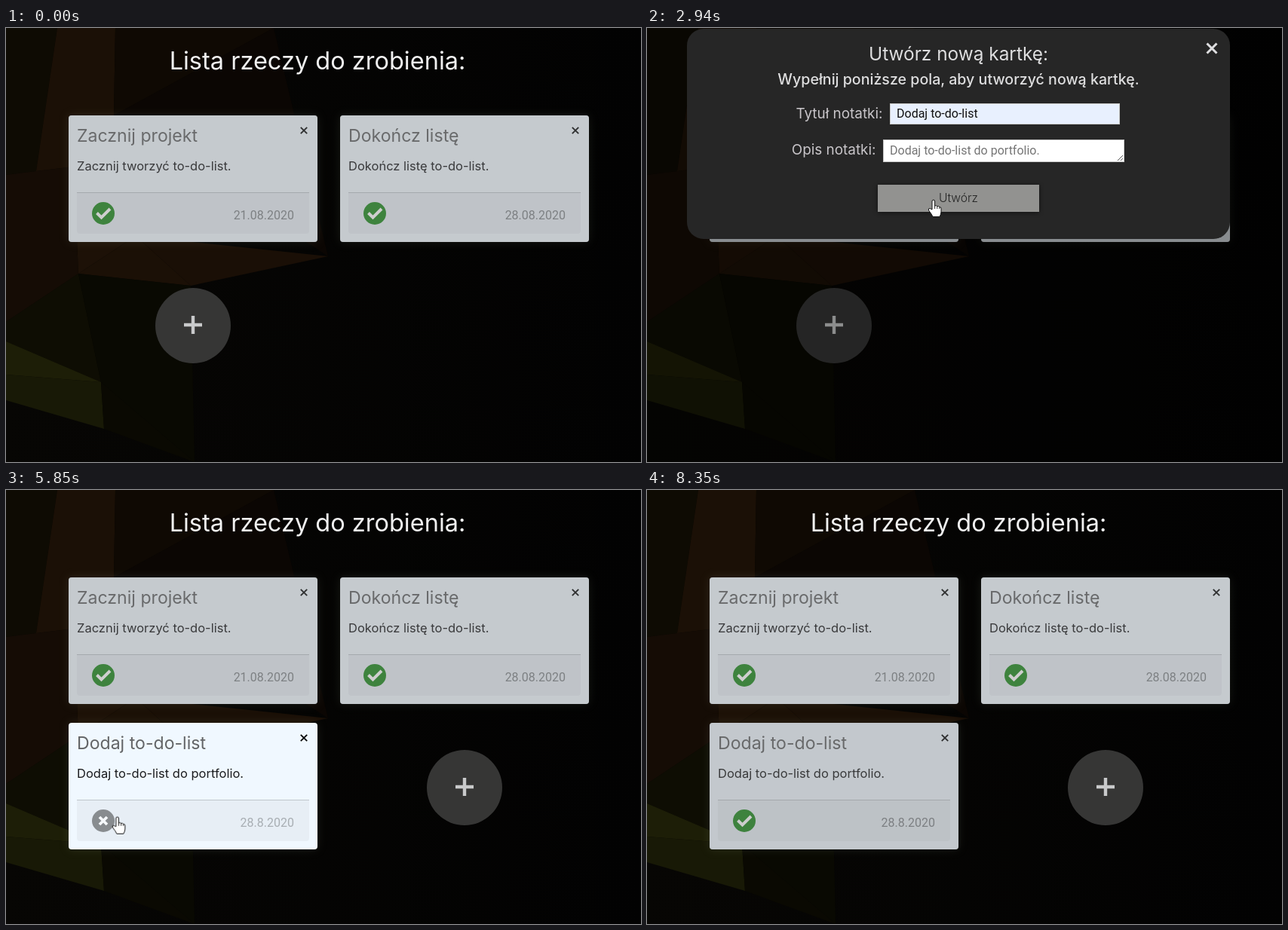
An HTML page that plays this animation: 842x576 px, repeating every 9.04 s.

```html
<!DOCTYPE html>
<html lang="pl">
<head>
<meta charset="utf-8">
<title>Lista rzeczy do zrobienia</title>
<style>
  html, body { margin: 0; width: 100%; height: 100%; overflow: hidden; background: #040302; }
  svg { display: block; width: 842px; height: 576px; }
  text { font-family: Inter, "Open Sans", sans-serif; }
  .roboto { font-family: Roboto, Arial, sans-serif; }
  .mid { text-anchor: middle; }
  .end { text-anchor: end; }
  .card { filter: drop-shadow(0 0 7px rgba(200, 215, 180, .1)); }
  .button { filter: drop-shadow(0 1px 3px #000); }
  .line { fill: none; }
  .off { opacity: 0; }
</style>
</head>
<body>
<svg id="stage" viewBox="0 0 842 576" xmlns="http://www.w3.org/2000/svg"></svg>
<script>
const LOOP = 9040;
const VEIL = .35;

const text = (x, y, size, str, attrs = '') =>
  `<text x="${x}" y="${y}" font-size="${size}" ${attrs}>${str}</text>`;

const box = (x, y, width, height, attrs) =>
  `<rect x="${x}" y="${y}" width="${width}" height="${height}" ${attrs}/>`;

const cross = (x, y, r, width, color) =>
  `<path class="line" stroke="${color}" stroke-width="${width}"
    d="M${x - r} ${y - r}l${2 * r} ${2 * r}m0 ${-2 * r}l${-2 * r} ${2 * r}"/>`;

const doneIcon = `<circle cx="46" cy="130" r="15" fill="#228b22"/>
  <path class="line" stroke="#fff" stroke-width="4" d="M37.500 129.500l6 6 11.500-11.500"/>`;
const openIcon = `<circle cx="46" cy="130" r="15" fill="#4e5052"/>
  ${cross(46, 130, 5, 3.8, '#fff')}`;

function card(id, x, y, title, body, date) {
  return `<g id="${id}" class="card" transform="translate(${x} ${y})">
    <rect width="330" height="168" rx="4" fill="#f0f8ff"/>
    ${text(11, 35, 23.1, title, 'fill="#636567"')}
    ${text(11, 73, 16.5, body, 'fill="#1b1c1e"')}
    ${cross(312, 20, 4.2, 1.9, '#0b0c0d')}
    <path d="M11 102h308v51q0 4-4 4h-300q-4 0-4-4z" fill-opacity=".04"/>
    <path d="M11 102.500h308" stroke="#000" stroke-opacity=".17"/>
    <g class="footer">
      <g class="done">${doneIcon}</g>
      <g class="open off">${openIcon}</g>
      ${text(299, 138, 16, date, 'class="roboto end" fill="#82878b"')}
    </g>
    <rect class="veil" width="330" height="168" rx="4" fill="#727272" opacity="${VEIL}"/>
  </g>`;
}

// Facets share corners; each is a string of corner names, a hue and a lightness.
const corners = {
  a: '0,0', b: '68,0', c: '145,0', d: '40,190', e: '0,195', f: '143,116', g: '355,0',
  h: '96,326', i: '0,390', j: '126,470', k: '0,416', l: '0,460', m: '130,532', n: '0,494',
  o: '172,276', p: '245,342', q: '427,303', s: '250,576', t: '90,184'
};
const facets = [
  ['abde', 40, 3.5], ['bcftd', 28, 6.5], ['cgf', 28, 3.6], ['gqf', 28, 2.6],
  ['edthi', 27, 5.2], ['tohh', 28, 7], ['hop', 28, 6.6], ['oqp', 27, 6.2],
  ['ihjk', 58, 3.3], ['hpsj', 60, 2.2], ['kjl', 62, 7.2], ['ljmn', 62, 6], ['jsm', 50, 2.4]
];
const facet = ([names, hue, light]) =>
  `<polygon points="${[...names].map(name => corners[name]).join(' ')}" fill="hsl(${hue} 62% ${light}%)"/>`;

const backdrop = `
  <linearGradient id="night"><stop stop-color="#070604"/><stop offset="1" stop-color="#020202"/></linearGradient>
  ${box(0, 0, 842, 576, 'fill="url(#night)"')}
  ${facets.map(facet).join('')}`;

const page = `
  ${text(413, 55, 32.5, 'Lista rzeczy do zrobienia:', 'class="mid" fill="#f1f1f1"')}
  ${card('first', 83, 116, 'Zacznij projekt', 'Zacznij tworzyć to-do-list.', '21.08.2020')}
  ${card('second', 443, 116, 'Dokończ listę', 'Dokończ listę to-do-list.', '28.08.2020')}
  <g id="added">
    ${card('third', 83, 309, 'Dodaj to-do-list', 'Dodaj to-do-list do portfolio.', '28.8.2020')}
  </g>
  <g id="add">
    <circle id="disc" cx="248" cy="395" r="50" fill="#363635"/>
    <path id="plus" d="M236 394h24m-12-12v24" stroke="#c9cacb" stroke-width="4.4"/>
  </g>`;

const modal = `<g id="modal">
  ${box(0, 0, 842, 576, 'opacity=".3"')}
  ${box(53, 1, 720, 279, 'rx="22" fill="#262626"')}
  ${text(413, 43, 24.4, 'Utwórz nową kartkę:', 'class="mid" fill="#dededf"')}
  ${text(413, 75, 19.6, 'Wypełnij poniższe pola, aby utworzyć nową kartkę.', 'class="mid" fill="#dededf" font-weight="500"')}
  ${text(312.5, 120, 18.9, 'Tytuł notatki:', 'class="end" fill="#c9c6ca"')}
  ${text(303.5, 168, 18.9, 'Opis notatki:', 'class="end" fill="#c9c6ca"')}
  ${cross(749, 27, 6.5, 3, '#dedee0')}
  ${box(322.5, 100.5, 304, 27, 'fill="#fff" stroke="#c8c8c8"')}
  ${box(313.5, 148.5, 319, 29, 'fill="#fff" stroke="#c8c8c8"')}
  <path d="M624 176l7-7m-3 7l3-3" stroke="#555"/>
  <g id="values">
    ${box(323, 101, 303, 26, 'fill="#e8f0fe"')}
    ${text(331, 119, 16, 'Dodaj to-do-list', 'class="roboto" fill="#111"')}
    ${text(322, 168, 16, 'Dodaj to-do-list do portfolio.', 'class="roboto" fill="#757575"')}
  </g>
  ${box(439, 105, 1, 18, 'id="caret"')}
  <g id="button" class="button">
    ${box(306, 208, 214, 36, 'fill="#fefffa"')}
    ${text(413, 231, 15.6, 'Utwórz', 'class="mid" fill="#222" font-weight="300"')}
  </g>
</g>`;

const cursor = `<g id="cursor">
  <circle id="click" r="12" fill="#ff0" fill-opacity=".53"/>
  <path id="arrow" fill="#fff" stroke="#111" d="M0 0V16.500L3.800 13 6.400 18.800 9 17.700 6.400 12H11.600z"/>
  <g id="hand" stroke="#111" transform="translate(1 2)">
    <path fill="#fff" d="M-2 13V2a1.800 1.800 0 0 1 3.600 0V8q2-1 3.200.600 2-.600 3 1 2.200-.200 2.200 2V16q0 3-2 6.500H-1q-1.500-3.500-5.500-8.500-.800-3 1.800-2.500z"/>
    <path class="line" d="M1.600 8v4m3.200-3.400v3.400m3-2.400v2.400" stroke-width=".9"/>
  </g>
</g>`;

document.getElementById('stage').innerHTML = backdrop + page + modal + cursor;

const started = document.timeline.currentTime || 0;

function play(selector, prop, points, easing) {
  const frames = points.map(([time, value]) =>
    ({ offset: Math.min(time / LOOP, 1), [prop]: value, easing }));
  const motion = document.querySelector(selector)
    .animate(frames, { duration: LOOP, iterations: Infinity });
  motion.startTime = started;
}

// Switches a property on during each span; a fade of 0 gives a hard change.
function toggle(selector, prop, [off, on], spans, fade = 0) {
  const points = spans.flatMap(([from, to]) =>
    [[from, off], [from + fade, on], [to, on], [to + fade, off]]);
  play(selector, prop, [[0, off], ...points, [LOOP, off]], 'linear');
}

const show = (selector, spans, fade) => toggle(selector, 'opacity', [0, 1], spans, fade);
const hide = (selector, spans, fade) => toggle(selector, 'opacity', [1, 0], spans, fade);

// Each move: start, end and the place reached.
const moves = [
  [310, 980, 262, 403],
  [1820, 2600, 379, 226],
  [3550, 4000, 474, 317],
  [4190, 4290, 473, 323],
  [5290, 6100, 125, 439],
  [6230, 6550, 176, 510],
  [6600, 6900, 125, 439],
  [7150, 7940, 434, 533],
  [8220, 8350, 470, 576]
];
let place = 'translate(449px, 570px)';
const route = [[0, place]];
for (const [from, to, x, y] of moves) {
  route.push([from, place]);
  place = `translate(${x}px, ${y}px)`;
  route.push([to, place]);
}
play('#cursor', 'transform', [...route, [LOOP, place]], 'ease');
show('#cursor', [[310, 8350]]);

const pointing = [[600, 2180], [2280, 3600], [3700, 5300], [5800, 6270], [6800, 7200]];
show('#hand', pointing);
hide('#arrow', pointing);
show('#click', [[1280, 1360], [3320, 3350], [4190, 4270], [6130, 6180]]);

const CREATED = [[3350, LOOP]], FINISHED = [[6130, LOOP]];

toggle('#disc', 'fill', ['#363635', '#505050'], [[600, 1360]], 200);
toggle('#plus', 'stroke', ['#c9cacb', '#e2e2e2'], [[600, 1360]], 200);
toggle('#add', 'transform', ['translate(0px)', 'translate(360px)'], CREATED);

show('#modal', [[1380, 4190]], 100);
hide('#values', CREATED);
show('#caret', [[1440, 1940], [2440, 2940]]);
toggle('#button', 'opacity', [1, .5], [[2260, 3620]], 300);

show('#added', CREATED);
show('#third .done', FINISHED);
hide('#third .open', FINISHED);
toggle('#third .footer', 'opacity', [.62, 1], FINISHED);
toggle('#third .veil', 'opacity', [0, VEIL], [[6360, 6680], [7300, LOOP]], 220);
</script>
</body>
</html>
```
